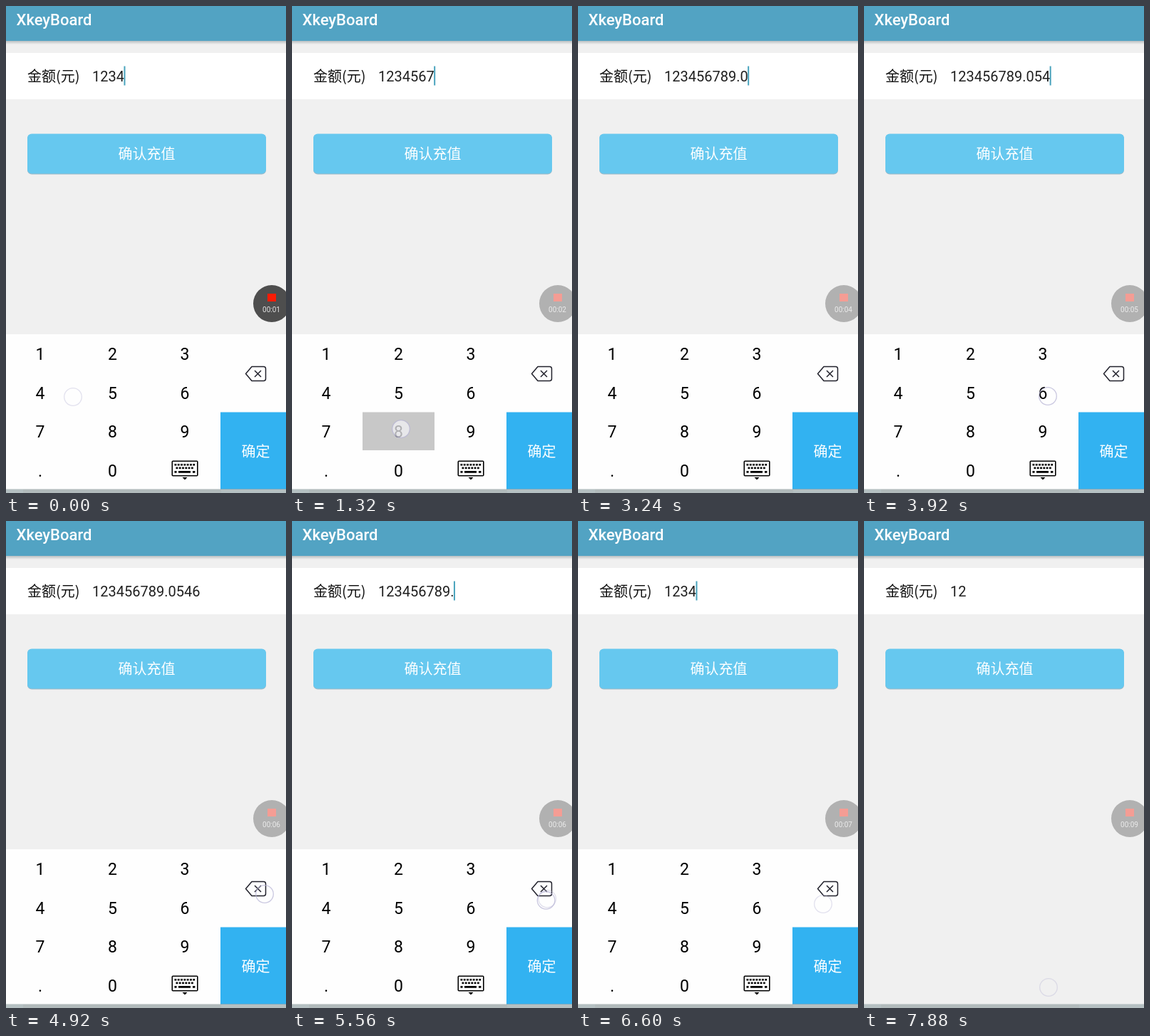
An HTML page with a canvas that plays this animation: 393 px wide and 684 px high, repeating every 8 s.

```html
<!DOCTYPE html>
<html lang="zh">
<head>
<meta charset="utf-8">
<style>
  html, body { margin: 0; width: 100%; height: 100%; overflow: hidden; background: #f0f0f0; }
  canvas { display: block; width: 393px; height: 684px; }
</style>
</head>
<body>
<canvas id="stage" width="393" height="684"></canvas>
<script>
const ctx = document.getElementById('stage').getContext('2d');
const LOOP = 8000, PRESS_DELAY = 40, BLINK = 500;
const LATIN = 'Roboto, sans-serif';
const HAN = '"Noto Sans CJK SC", "Noto Sans CJK", "Noto Sans CJK JP", sans-serif';
const COLS = [0, 99, 201, 302, 393];
const ROWS = [461, 515.5, 570.5, 624.5, 679];
const KEYS = ['123', '456', '789', '.0#'];
const START_TEXT = '123';

// key, touch down, release, x, y, fade time of the touch mark
const TAPS = [
  ['4', -200, -60, 94, 549], ['5', 60, 240, 160, 549], ['6', 340, 500, 262, 552],
  ['7', 1070, 1190, 62, 598], ['8', 1240, 1440, 153, 594], ['9', 1570, 1770, 272, 600],
  ['.', 2540, 2670, 60, 652, 170], ['0', 3040, 3120, 158, 654, 110],
  ['5', 3360, 3510, 160, 546], ['4', 3600, 3740, 62, 546], ['6', 3920, 4070, 258, 548],
  ['<', 4910, 5040, 363, 524]
];
for (let i = 1; i < 7; i++) {
  const up = 5040 + 155 * i;
  TAPS.push(['<', up - 115, up, 363 - i * 1.6, 524 + i * 2.2]);
}
TAPS.push(
  ['<', 5980, 6150, 350, 539], ['<', 6220, 6350, 348, 538], ['<', 6420, 6540, 344, 538],
  ['<', 6720, 6850, 346, 537], ['<', 7180, 7310, 347, 538], ['#', 7670, 7735, 259, 655, 300]
);
const TICKS = [830, 1860, 2840, 3810, 4740, 5725, 6725, 7680];

function rect(x, y, w, h, color) {
  ctx.fillStyle = color;
  ctx.fillRect(x, y, w, h);
}
function label(text, x, y, font, color, align = 'left') {
  ctx.font = font;
  ctx.fillStyle = color;
  ctx.textAlign = align;
  ctx.fillText(text, x, y);
}
function disc(x, y, r, color) {
  ctx.fillStyle = color;
  ctx.beginPath();
  ctx.arc(x, y, r, 0, 7);
  ctx.fill();
}
function rounded(x, y, w, h, r) {
  ctx.beginPath();
  ctx.roundRect(x, y, w, h, r);
}

function inputState(t) {
  let text = START_TEXT, changed = 0, open = true;
  for (const [key, , up] of TAPS) {
    if (up > t) break;
    if (key === '#') open = false;
    else text = key === '<' ? text.slice(0, -1) : text + key;
    changed = up;
  }
  return { text, open, cursor: open && (t - changed) % (2 * BLINK) < BLINK };
}

function drawPage({ text, cursor }) {
  rect(0, 0, 393, 684, '#f0f0f0');
  rect(0, 0, 393, 49, '#52a3c3');
  const shade = ctx.createLinearGradient(0, 49, 0, 54);
  shade.addColorStop(0, '#b9bfc1');
  shade.addColorStop(1, '#f0f0f0');
  rect(0, 49, 393, 5, shade);
  label('XkeyBoard', 14.5, 26.5, '500 22px ' + LATIN, '#fff');

  rect(0, 66, 393, 65, '#fff');
  label('金额(元)', 30, 106, '20px ' + HAN, '#101010');
  label(text, 121, 106, '20px ' + LATIN, '#202020');
  if (cursor) rect(120.5 + ctx.measureText(text).width, 84.5, 2, 27, '#48a3bd');

  rounded(30, 180, 335, 56.5, 6);
  ctx.fillStyle = '#9fb9c6';
  ctx.fill();
  rounded(30, 179.5, 335, 56, 6);
  ctx.fillStyle = '#66c8ef';
  ctx.fill();
  label('确认充值', 197.5, 215, '20px ' + HAN, '#fff', 'center');
}

function drawRecorder(t) {
  const strength = 1 - 0.61 * Math.min(1, Math.max(0, (t - 60) / 240));
  const faded = rgb => `rgb(${rgb.map(c => Math.round(240 + (c - 240) * strength))})`;
  const seconds = 1 + TICKS.filter(tick => tick <= t).length;
  disc(373, 418, 26, faded([78, 78, 78]));
  rect(367, 404, 12, 11, faded([250, 28, 5]));
  label('00:0' + seconds, 372.5, 429.5, '10px ' + LATIN, faded([228, 228, 228]), 'center');
}

function drawBackspace() {
  ctx.strokeStyle = '#22222c';
  ctx.lineWidth = 1.5;
  ctx.lineJoin = 'round';
  ctx.beginPath();
  ctx.moveTo(336.5, 516.5);
  ctx.lineTo(345, 506.5);
  ctx.arcTo(364.5, 506.5, 364.5, 516, 3);
  ctx.arcTo(364.5, 526.5, 350, 526.5, 3);
  ctx.lineTo(345, 526.5);
  ctx.closePath();
  ctx.moveTo(349, 512);
  ctx.lineTo(358, 521);
  ctx.moveTo(358, 512);
  ctx.lineTo(349, 521);
  ctx.stroke();
}

function drawKeyboardIcon() {
  ctx.strokeStyle = '#000';
  ctx.lineWidth = 1.6;
  rounded(233.3, 639.3, 35.5, 20.5, 1);
  ctx.stroke();
  for (let i = 0; i < 7; i++) {
    rect(236.5 + i * 4.3, 643, 2.8, 2.6, '#000');
    if (i < 6) rect(238.5 + i * 4.3, 647.6, 2.8, 2.6, '#000');
  }
  rect(236.5, 653, 3, 2.8, '#000');
  rect(242, 653, 17, 2.8, '#000');
  rect(262, 653, 3.4, 2.8, '#000');
  ctx.fillStyle = '#000';
  ctx.beginPath();
  ctx.moveTo(247.5, 662);
  ctx.lineTo(254.5, 662);
  ctx.lineTo(251, 665.5);
  ctx.fill();
}

function drawKeyboard(t) {
  const held = TAPS.find(([, down, up]) => t >= down + PRESS_DELAY && t < up);
  const pressed = held && held[0];
  rect(0, 461, 393, 218, '#fefefe');
  KEYS.forEach((row, r) => [...row].forEach((key, c) => {
    if (key === pressed) {
      rect(COLS[c], ROWS[r], COLS[c + 1] - COLS[c] - 1, ROWS[r + 1] - ROWS[r] - 0.5, '#c8c8c8');
    }
    if (key !== '#') {
      label(key, [48, 149.5, 251][c], 497 + r * 54.6, '23px ' + LATIN, '#000', 'center');
    }
  }));
  if (pressed === '<') rect(302, 461, 91, 110, '#c8c8c8');
  drawBackspace();
  drawKeyboardIcon();
  rect(301, 570.5, 92, 108.5, '#32b2f1');
  rect(301, 678, 92, 1, '#2b94c9');
  label('确定', 350.5, 633, '300 20px ' + HAN, '#fff', 'center');
}

function drawTouches(t) {
  for (const [, down, up, x, y, fade = 130] of TAPS) {
    if (t < down || t >= up + fade) continue;
    const holding = t >= down + PRESS_DELAY && t < up;
    const alpha = t < up ? 1 : 1 - (t - up) / fade;
    if (holding) disc(x, y, 12, 'rgba(242,242,246,.72)');
    ctx.strokeStyle = `rgba(184,182,214,${0.75 * alpha})`;
    ctx.lineWidth = 1.3;
    ctx.beginPath();
    ctx.arc(x, y, 12.3, 0, 7);
    ctx.stroke();
  }
}

function draw(now) {
  const t = now % LOOP;
  const state = inputState(t);
  drawPage(state);
  if (state.open) drawKeyboard(t);
  rect(0, 678.5, 393, 5.5, '#b5c0c2');
  rect(24, 679, 278, 5, '#b1babb');
  drawRecorder(t);
  drawTouches(t);
}

const begin = performance.now();
function tick() {
  draw(performance.now() - begin);
  requestAnimationFrame(tick);
}
tick();
</script>
</body>
</html>
```
